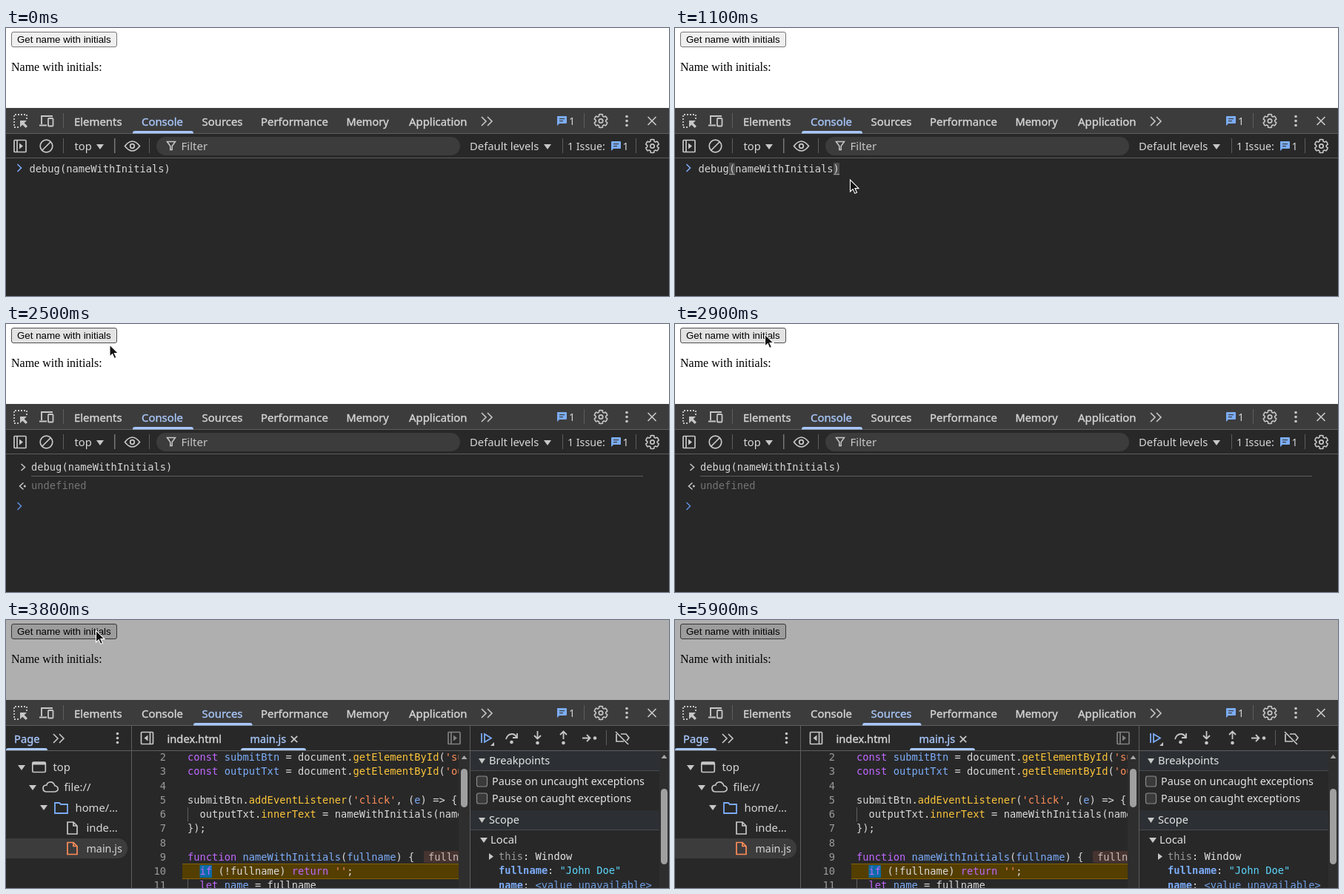
Write an HTML page with a canvas that moves like this. It is 895 by 362 pixels and loops after 6.1 s.

```html
<!DOCTYPE html>
<html lang="en">
<head>
<meta charset="utf-8">
<title>Debugging a function</title>
<style>
html, body { margin: 0; width: 100%; height: 100%; overflow: hidden; background: #fff; }
canvas { display: block; width: 895px; height: 362px; }
</style>
</head>
<body>
<canvas id="stage" width="895" height="362"></canvas>
<script>
const ctx = document.getElementById('stage').getContext('2d');
const LOOP = 6100;
const UI = '"Noto Sans", "Open Sans", sans-serif';
const MONO = '"DejaVu Sans Mono", monospace';
const SANS = '"Liberation Sans", Arial, sans-serif';
const SERIF = '"Liberation Serif", "Times New Roman", serif';
const BG = '#282828', BAR = '#3c3c3c', EDGE = '#5e5e5e', TEXT = '#d6d6d6';
const ICON = '#c7c7c7', BLUE = '#7cacf8', PALE = '#a8c7fa';
const INK = { k: '#bf67ff', v: '#7cacf8', p: '#d9d9d9', y: '#fcc53a', s: '#fe8d59' };

function rect(x, y, w, h, color) {
  ctx.fillStyle = color;
  ctx.fillRect(x, y, w, h);
}

function round(x, y, w, h, r, fill, line, width = 1.5) {
  ctx.beginPath();
  ctx.roundRect(x, y, w, h, r);
  if (fill) { ctx.fillStyle = fill; ctx.fill(); }
  if (line) { ctx.strokeStyle = line; ctx.lineWidth = width; ctx.stroke(); }
}

function text(str, x, y, color, font, align = 'left') {
  ctx.font = font;
  ctx.textAlign = align;
  ctx.fillStyle = color;
  ctx.fillText(str, x, y);
}

const label = (str, x, y, color = TEXT, size = 14.8) =>
  text(str, x, y, color, size + 'px ' + UI);

// Slightly heavier label
function strong(str, x, y, color = TEXT, size = 14.9) {
  label(str, x, y, color, size);
  ctx.strokeStyle = color;
  ctx.lineWidth = 0.35;
  ctx.strokeText(str, x, y);
}

const mono = (str, x, y, color, style = '') =>
  text(str, x, y, color, style + ' 13.75px ' + MONO);

// Path data drawn relative to (x, y)
function path(d, x, y, color, width = 1.7, fill = false) {
  const p = new Path2D(d);
  ctx.save();
  ctx.translate(x, y);
  if (fill) { ctx.fillStyle = color; ctx.fill(p); }
  else { ctx.strokeStyle = color; ctx.lineWidth = width; ctx.stroke(p); }
  ctx.restore();
}

function ring(x, y, r, color, width = 1.7) {
  ctx.beginPath();
  ctx.arc(x, y, r, 0, Math.PI * 2);
  ctx.strokeStyle = color;
  ctx.lineWidth = width;
  ctx.stroke();
}

function dot(x, y, r, color) {
  ctx.beginPath();
  ctx.arc(x, y, r, 0, Math.PI * 2);
  ctx.fillStyle = color;
  ctx.fill();
}

function clipped(x, y, w, h, draw) {
  ctx.save();
  ctx.beginPath();
  ctx.rect(x, y, w, h);
  ctx.clip();
  draw();
  ctx.restore();
}

const divider = (x, y) => rect(x, y, 1, 20, EDGE);
const down = (x, y, w = 10, h = 7) => path(`M0 0H${w}L${w / 2} ${h}Z`, x, y, ICON, 0, true);
const chevrons = (x, y) => path('M1 1L7 7L1 13M9 1L15 7L9 13', x, y, ICON, 1.6);
const cross = (x, y, r) => path(`M${-r} ${-r}L${r} ${r}M${r} ${-r}L${-r} ${r}`, x, y, ICON, 1.7);
const underline = (x, w, y, h) => round(x, y, w, h, [3, 3, 0, 0], PALE);

function kebab(x, y) {
  for (const dy of [-6, 0, 6]) dot(x, y + dy, 1.8, ICON);
}

function gear(x, y) {
  ctx.beginPath();
  for (let i = 0; i < 48; i++) {
    const a = i / 48 * Math.PI * 2, r = Math.cos(a * 6) > -0.1 ? 9 : 6.8;
    ctx.lineTo(x + r * Math.sin(a), y + r * Math.cos(a));
  }
  ctx.closePath();
  ctx.strokeStyle = ICON;
  ctx.lineWidth = 1.6;
  ctx.stroke();
  ring(x, y, 2.7, ICON, 1.7);
}

function issues(x, y) {
  path('M1 0H12Q13 0 13 1V9Q13 10 12 10H3L0 13V1Q0 0 1 0Z', x, y, BLUE, 0, true);
  rect(x + 3, y + 3, 7, 1.2, BAR);
  rect(x + 3, y + 6, 5, 1.2, BAR);
}

function panelIcon(x, y, flip, color = ICON) {
  ctx.save();
  ctx.translate(x, y);
  ctx.scale(flip ? -1 : 1, 1);
  round(-8, -8, 16, 16, 1, null, color, 1.7);
  path('M-4 -8V8', 0, 0, color, 1.7);
  path('M-1 -4L4 0L-1 4Z', 0, 0, color, 0, true);
  ctx.restore();
}

function page(hover, pressed, dim) {
  rect(0, 0, 895, 108, '#fff');
  const face = pressed ? '#f5f5f5' : hover ? '#e3e3e3' : '#efefef';
  round(7.5, 5.5, 142, 20, 2.5, face, hover ? '#4f4f4f' : '#767676', 1);
  text('Get name with initials', 15, 20, '#000', '13.333px ' + SANS);
  text('Name with initials:', 7, 58, '#000', '16px ' + SERIF);
  if (dim) rect(0, 0, 895, 108, 'rgba(0,0,0,.315)');
}

function mainBar(active, lineX, lineW, hover) {
  rect(0, 108, 895, 254, BG);
  rect(0, 108, 895, 34, BAR);
  rect(0, 142, 895, 1, EDGE);
  if (hover) rect(171, 109, 82, 33, '#505050');

  ctx.setLineDash([2, 2]);
  path('M18 7V1H1V18H8', 10, 116, ICON, 1.8);
  ctx.setLineDash([]);
  path('M9 9H18L14.7 12.2L19 16.7L16.7 19L12.3 14.7L9 18Z', 10, 116, ICON, 0, true);
  path('M3 13V2H18M0 14.5H10', 45, 117, ICON, 1.9);
  round(57, 122, 6.5, 10.5, 1, null, ICON, 1.8);
  divider(77, 115);

  const tabs = [['Elements', 92], ['Console', 183], ['Sources', 264.5], ['Performance', 344],
    ['Memory', 459.5, 14.5], ['Application', 544]];
  for (const [name, x, size] of tabs) strong(name, x, 132, name === active ? PALE : TEXT, size);
  underline(lineX, lineW, 139, 3.5);
  chevrons(641, 119);
  issues(744, 119);
  label('1', 760, 131, TEXT, 14);
  divider(780, 115);
  gear(803, 125.5);
  kebab(838, 125.5);
  cross(872, 125.5, 5.5);
}

function consoleBar() {
  rect(0, 175, 895, 1, EDGE);
  panelIcon(19, 159.5);
  ring(54.5, 159.5, 8.3, ICON);
  path('M-6 6L6 -6', 54.5, 159.5, ICON);
  divider(77, 149);
  label('top', 92.5, 165);
  down(122, 157);
  rect(146, 149, 1.5, 20, '#777');
  path('M-10 0Q0 -13 10 0Q0 13 -10 0Z', 170.5, 159.5, ICON, 1.7);
  ring(170.5, 159.5, 2.8, ICON, 1.8);
  divider(193, 149);
  round(203, 147, 410, 25, 12.5, BAR);
  path('M0 0H11L6.7 6V11H4.3V6Z', 217.5, 153.5, ICON, 1.5);
  label('Filter', 236.5, 165, '#c7c7c7', 15);
  label('Default levels', 626, 165);
  down(726, 157);
  divider(751, 149);
  label('1 Issue:', 758, 165, TEXT, 14.2);
  issues(817, 153);
  label('1', 832.5, 165, TEXT, 14);
  divider(850, 149);
  gear(872.5, 159.5);
}

function consoleView(t) {
  mainBar('Console', 171, 82, t >= 2100 && t < 2300);
  consoleBar();
  const call = 'debug(nameWithInitials)';
  if (t < 1200) {
    path('M0 0L5 5L0 10', 15.5, 184, BLUE, 1.6);
    if (t >= 1100) {
      for (const x of [73, 214]) {
        rect(x, 182, 8, 17, '#4c4c4c');
        rect(x, 197, 8, 1, '#999');
      }
    }
    mono(call, 31.5, 195, TEXT);
    return;
  }
  path('M0 0L5 4.5L0 9', 20.5, 189, ICON, 1.5);
  mono(call, 34, 198, TEXT);
  rect(34, 205, 826, 1, EDGE);
  path('M5 0L0 4.5L5 9', 18.5, 214.5, ICON, 1.5);
  dot(25.3, 219, 1.5, ICON);
  mono('undefined', 34, 223, '#747474');
  path('M0 0L5 5L0 10', 15.5, 241, '#5b8bd8', 1.6);
  if (t >= 1700 && t < 2200) rect(31, 240, 1, 16, '#fff');
}

function fileIcon(x, y, color) {
  path('M1 1H9L14 6V17H1ZM9 1V6H14', x, y, color, 1.7);
}

function tree() {
  strong('Page', 11, 166, PALE, 14.7);
  underline(0, 56, 173, 3);
  chevrons(63, 153);
  kebab(150.5, 159.5);
  round(-12, 295, 176, 27, 13, BAR);
  down(16, 196);
  round(35.8, 192, 17.5, 13.5, 1.5, null, ICON, 1.7);
  rect(36, 192, 17, 3.5, ICON);
  label('top', 63.5, 204);
  down(31, 223);
  path('M6 15H17Q22 14 21 10Q20 7 17 7Q15 1 10 2Q6 3 6 6Q1 6 1 10Q1 15 6 15Z', 49, 217, ICON, 1.7);
  label('file://', 78.5, 231);
  down(46, 250);
  path('M1 15V1H7L9 3H18V15Z', 65, 246, BLUE, 1.8);
  label('home/…', 93.5, 259);
  fileIcon(82, 272, ICON);
  label('inde…', 108.5, 286);
  fileIcon(82, 299.5, INK.s);
  label('main.js', 108.5, 314, TEXT, 14.3);
}

// Each run is a colour key followed by its text
const CODE = {
  2: "kconst |vsubmitBtn|p = document.|ygetElementById|p(|s'submit'|p);",
  3: "kconst |voutputTxt|p = document.|ygetElementById|p(|s'output'|p);",
  5: "psubmitBtn.|yaddEventListener|p(|s'click'|p, (|ve|p) => {",
  6: 'p  outputTxt.|yinnerText|p = nameWithInitials(name);',
  7: 'p});',
  9: 'kfunction |vnameWithInitials|p(|vfullname|p) {',
  10: "p  |kif|p (!fullname) |kreturn |s''|p;",
  11: 'p  |klet |vname|p = fullname'
};

function editor(t) {
  panelIcon(190.5, 159.5, true);
  strong('index.html', 217.5, 166, TEXT, 14.7);
  strong('main.js', 329.5, 166, PALE, 14.4);
  cross(389, 161, 4.2);
  underline(317, 88, 173, 3);
  panelIcon(605, 159.5, false, '#808080');

  const paused = t >= 3200;
  clipped(170, 177, 441, 185, () => {
    for (let n = 2; n <= 11; n++) {
      const y = 190.2 + (n - 2) * 19.25;
      if (n === 6 || n > 9) rect(245, y - 14, 1, 19, '#606060');
      if (n === 10 && paused) {
        rect(238, 329, 373, 21, '#856300');
        rect(238, 330, 373, 19, '#543e00');
        rect(261.5, 331, 16.5, 17, '#086ca6');
      }
      text(String(n), 216, y, '#9a9a9a', '13.75px ' + MONO, 'right');
      let x = 245;
      for (const run of (CODE[n] || '').split('|')) {
        const part = run.slice(1);
        mono(part, x, y, INK[run[0]]);
        x += ctx.measureText(part).width;
      }
    }
    if (t >= 3400) {
      round(564, 312, 60, 16, 2, '#463431');
      mono('fullname = "John Doe"', 570, 325, '#c9bcb8');
    }
    const blinkOff = t >= 3800 && t < 4400 || t >= 5000 && t < 5600 || t >= 5900;
    if (!blinkOff) rect(261, 331, 1, 17, '#fff');
  });
  rect(611, 177, 15, 185, '#2e2e2e');
  path('M0 5L4 0L8 5Z', 614.5, 183, '#a8a8a8', 0, true);
  round(614, 201, 9, 52, 4.5, '#a0a0a0');
}

function stepIcons() {
  path('M1 1V14M5 2L14 7.5L5 13Z', 641, 152, BLUE, 1.8);
  path('M0 5H5V0Z', 654, 165, ICON, 0, true);
  path('M1 9Q3 2 9 2Q13 2 15 6M16 1V7H10', 674, 152, ICON, 1.8);
  dot(682.5, 165, 2.3, ICON);
  path('M0 0V10M-4.5 6L0 10.5L4.5 6', 717.5, 150, ICON, 1.8);
  dot(717.5, 166, 2.3, ICON);
  path('M0 11V1M-4.5 5L0 .5L4.5 5', 752.5, 150, ICON, 1.8);
  dot(752.5, 166, 2.3, ICON);
  path('M0 0H10M6 -4.5L10.5 0L6 4.5', 778, 159.5, ICON, 1.8);
  dot(795, 159.5, 2.3, ICON);
  divider(810, 149);
  path('M2 3V13H12M8 3H15L19 8L16 12M1 0L18 17', 822, 151, ICON, 1.7);
}

function section(name, y) {
  rect(627, y, 255, 27, '#2c3034');
  rect(627, y + 26, 255, 1, '#484b4e');
  down(638, y + 10, 9, 7);
  label(name, 652, y + 18, '#e3e3e3', 14.6);
}

function sidebar(t) {
  stepIcons();
  section('Breakpoints', 177);
  for (const [kind, y] of [['uncaught', 223], ['caught', 246]]) {
    round(635.5, y - 12, 14, 14, 2.5, '#3a3a3a', '#8a8a8a', 1.2);
    label(`Pause on ${kind} exceptions`, 656, y, '#e3e3e3', 14.35);
  }
  section('Scope', 257);
  const ready = t >= 3400;
  if (ready) {
    down(640, 294);
    label('Local', 654, 302, '#e3e3e3', 14.8);
    path('M0 0L6 4.5L0 9Z', 652, 315, ICON, 0, true);
    mono('this', 665, 324, '#9a9a9a');
    mono(': Window', 698, 324, '#e3e3e3');
    mono('fullname', 665, 343, BLUE, 'bold');
    mono(':', 731, 343, TEXT);
    mono('"John Doe"', 747.5, 343, '#5cd5fb');
    mono('name', 665, 363, BLUE, 'bold');
    mono(':', 698, 363, TEXT);
    mono('<value unavailable>', 714.5, 363, '#6f9fe6');
  } else {
    section('Call Stack', 316);
    for (const y of [305, 364])
      text('Not paused', 755, y, '#8f8f8f', 'italic 14.4px ' + UI, 'center');
  }
  rect(882, 177, 13, 185, '#2e2e2e');
  path('M0 5L4 0L8 5Z', 884.5, 182, '#a8a8a8', 0, true);
  round(884, ready ? 228 : 238, 9, ready ? 102 : 130, 4.5, '#a0a0a0');
}

function sourcesView(t) {
  const x = t < 3200 ? 198 : t < 3400 ? 246 : 253;
  mainBar('Sources', x, 79.5, false);
  rect(0, 176, 895, 1, EDGE);
  tree();
  editor(t);
  sidebar(t);
  rect(169, 143, 1, 219, EDGE);
  rect(626, 143, 1, 219, EDGE);
}

// time, x, y
const TRACK = [[200, 7, 10], [600, 236.5, 205], [2000, 236.5, 205], [2100, 230.5, 164],
  [2300, 190, 80], [2500, 140, 28], [2700, 121.5, 14], [5600, 121.5, 14]];

function pointer(t) {
  if (t < 200 || t >= 5600) return null;
  const i = TRACK.findIndex(k => k[0] > t);
  const [t0, x0, y0] = TRACK[i - 1], [t1, x1, y1] = TRACK[i];
  const p = (t - t0) / (t1 - t0);
  return [x0 + (x1 - x0) * p, y0 + (y1 - y0) * p];
}

function drawPointer([x, y]) {
  const d = 'M0 0V16L3.7 12.6L6.2 18.4L9 17.2L6.4 11.6H11.5Z';
  path(d, x, y, '#111', 0, true);
  path(d, x, y, '#fff', 1.1);
}

function draw(t) {
  page(t >= 2500, t >= 2800 && t < 2900, t >= 3100);
  if (t < 3100) consoleView(t);
  else sourcesView(t);
  const at = pointer(t);
  if (at) drawPointer(at);
}

const start = performance.now();
function tick() {
  const t = (performance.now() - start) % LOOP;
  draw(Math.floor(t / 100) * 100);
  requestAnimationFrame(tick);
}
tick();
</script>
</body>
</html>
```
